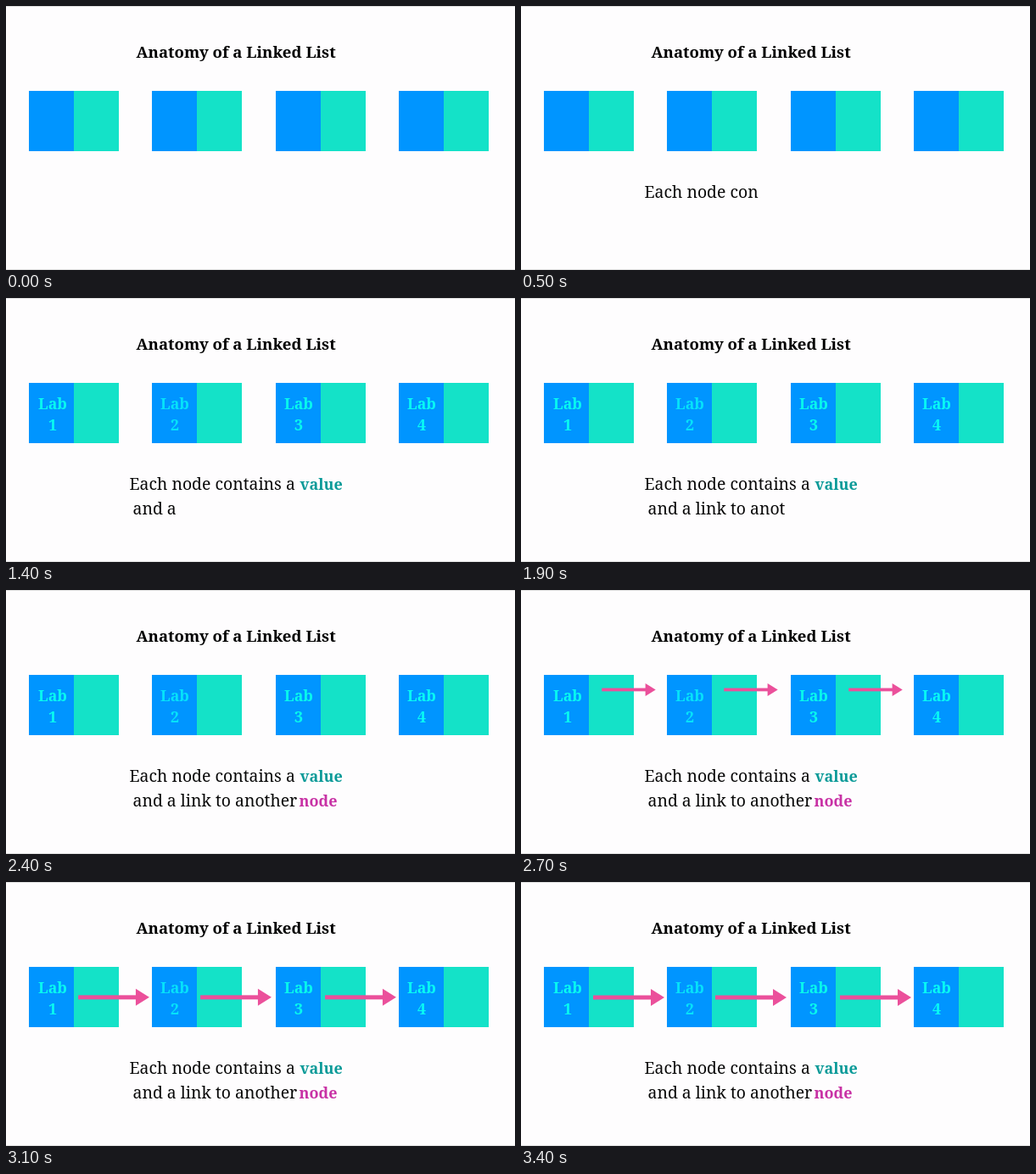
These frames come from a looping animation (600 px wide and 311 px high, 3500 ms). An HTML page with a canvas:

```html
<!DOCTYPE html>
<html lang="en">
<head>
<meta charset="utf-8">
<title>Anatomy of a Linked List</title>
<style>
  html, body { margin: 0; width: 100%; height: 100%; overflow: hidden; background: #fefdfe; }
  canvas { display: block; }
</style>
</head>
<body>
<canvas id="stage" width="600" height="311"></canvas>
<script>
const ctx = document.getElementById('stage').getContext('2d');
const LOOP = 3500, STEP = 100;
const TYPE_RATE = 0.026; // characters per ms
const clamp = v => Math.min(1, Math.max(0, v));
const easeInOut = u => u < 0.5 ? 4 * u ** 3 : 1 - 4 * (1 - u) ** 3;
const easeOut = u => 1 - (1 - u) ** 3;

const lines = [
  { start: 0, x: 145.5, y: 226, plain: 'Each node contains a ', word: 'value', wordX: 346.5, color: '#0a9a98' },
  { start: 1200, x: 149.5, y: 255, plain: 'and a link to another ', word: 'node', wordX: 345.5, color: '#c832a5' }
];
const labels = [
  { x: 55, color: '#08fcf0' },
  { x: 199, color: '#06e2fa' },
  { x: 345, color: '#08fcec' },
  { x: 490, color: '#08fcf4' }
];
const arrows = [127, 271, 418];

function rect(x, y, w, h, color) {
  ctx.fillStyle = color;
  ctx.fillRect(x, y, w, h);
}

function text(str, x, y, size, color, weight = 700, align = 'left') {
  ctx.font = `${weight} ${size}px "Noto Serif", serif`;
  ctx.textAlign = align;
  ctx.fillStyle = color;
  ctx.fillText(str, x, y);
}

function drawLine(line, t) {
  const count = Math.max(0, Math.floor((t - line.start) * TYPE_RATE));
  text(line.plain.slice(0, count), line.x, line.y, 19.4, '#080808', 400);
  text(line.word.slice(0, Math.max(0, count - line.plain.length)), line.wordX, line.y, 18, line.color);
}

function drawLabels(t) {
  const p = easeInOut(clamp((t - 995) / 267));
  const from = -81;
  labels.forEach(({ x, color }, i) => {
    const cx = from + (x - from) * p;
    text('Lab', cx, 131, 17.8, color, 700, 'center');
    text(i + 1, cx, 156, 18, color, 700, 'center');
  });
}

function drawArrow(x, t) {
  const s = easeOut(clamp((t - 2400) / 800));
  if (!s) return;
  ctx.save();
  ctx.translate(x, 136 - 76 * (1 - s));
  ctx.scale(s, s);
  rect(-42, -2.5, 69, 5, '#eb509b');
  ctx.beginPath();
  ctx.moveTo(26, -10);
  ctx.lineTo(42, 0);
  ctx.lineTo(26, 10);
  ctx.fill();
  ctx.restore();
}

function draw(t) {
  rect(0, 0, 600, 311, '#fefdfe');
  rect(0, 0, 600, 1, '#e0e0e0');
  rect(0, 310, 600, 1, '#e0e0e0');
  text('Anatomy of a Linked List', 153.5, 61, 18.6, '#000');
  for (let i = 0; i < 4; i++) {
    const x = Math.round(27 + 145.4 * i);
    rect(x, 100, 106, 71, '#14e2c8');
    rect(x, 100, 53, 71, '#0095ff');
  }
  drawLabels(t);
  lines.forEach(line => drawLine(line, t));
  arrows.forEach(x => drawArrow(x, t));
}

const origin = performance.now();
function tick() {
  const t = (performance.now() - origin) % LOOP;
  draw(Math.floor(t / STEP) * STEP);
  requestAnimationFrame(tick);
}
tick();
</script>
</body>
</html>
```
